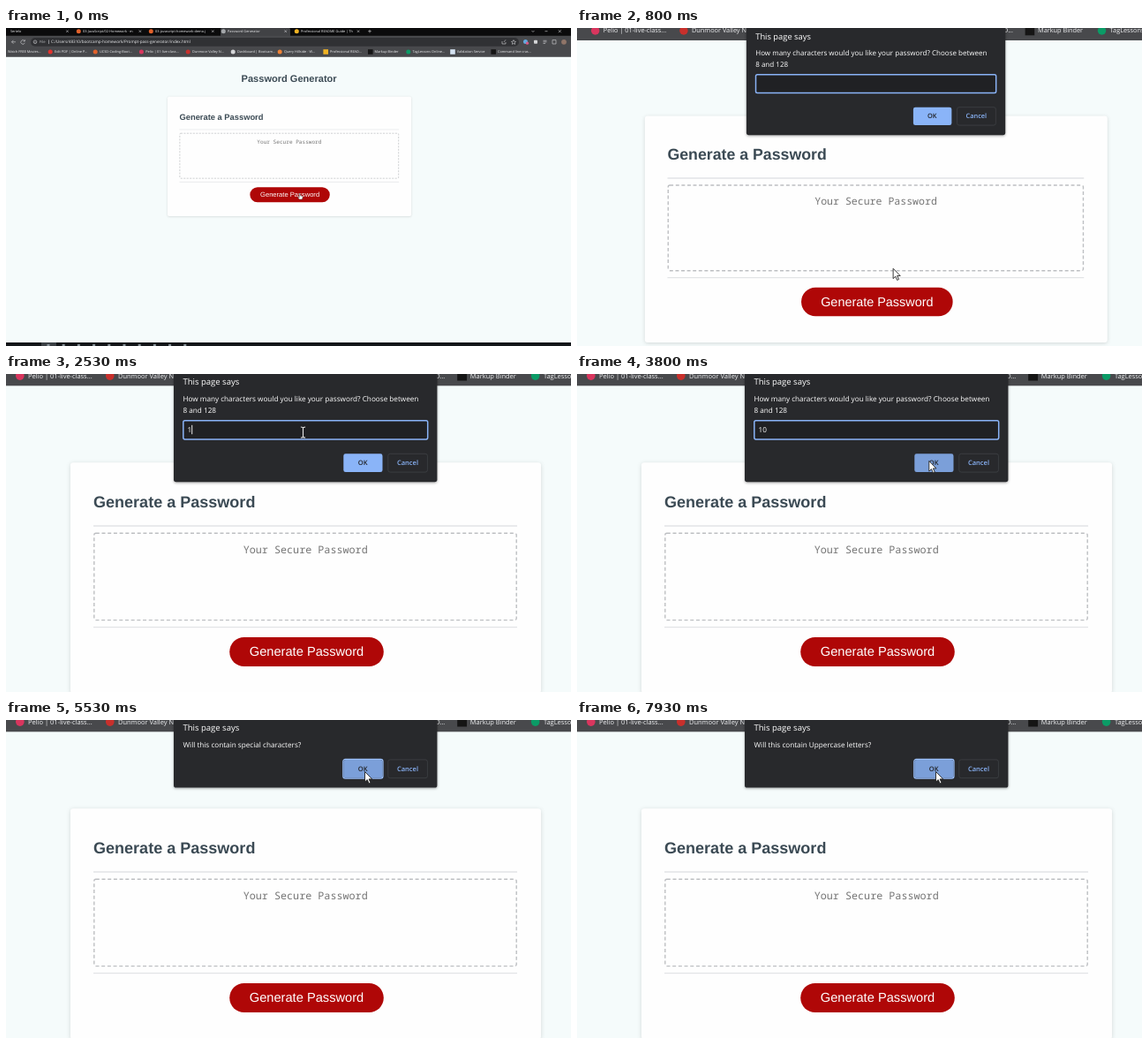
Animation of 640x360 px, one loop 8000 ms. Source, as an HTML page:

```html
<!DOCTYPE html>
<html lang="en">
<head>
<meta charset="utf-8">
<title>Password Generator</title>
<style>
  html, body { margin: 0; width: 100%; height: 100%; overflow: hidden; background: #f5fbfb; }
  svg { display: block; width: 640px; height: 360px; }
  text { text-rendering: geometricPrecision; white-space: pre; }
  .ui { font-family: "Open Sans", "Noto Sans", sans-serif; }
  .page { font-family: "Liberation Sans", Arial, sans-serif; fill: #3b4a54; }
  .mid { text-anchor: middle; }
  .card { filter: drop-shadow(0 1.3px 2.4px rgba(0, 0, 0, .14)); }
  .dialog { filter: drop-shadow(0 1px 1.6px rgba(0, 0, 0, .35)); }
  .line { fill: none; stroke: #d5d6d8; stroke-width: .6; }
</style>
</head>
<body>
<svg viewBox="0 0 640 360">
  <g id="camera">
    <!-- Browser window, in units of the unzoomed screen -->
    <g id="browser" class="ui" transform="translate(-280.3 -50) scale(1.9305)" fill="#eeeff1" font-size="3.87"></g>

    <g class="page">
      <text class="mid" x="338.7" y="67.5" font-size="21.33" font-weight="700">Password Generator</text>
      <rect class="card" x="73" y="100.3" width="533" height="261" rx="3.3" fill="#fefefe"/>
      <text x="99" y="151" font-size="18.05" font-weight="700">Generate a Password</text>
      <path d="M99 172H579M99 286.6H579" stroke="#e2e4e6" stroke-width="1.4"/>
      <rect x="99.8" y="180.2" width="478.4" height="98.4" rx="2" fill="none" stroke="#bdbfc2" stroke-width="1.4" stroke-dasharray="4 2.7"/>
      <text class="mid" x="339.2" y="202.8" font-size="11.75" fill="#757575" style="font-family:'Noto Sans Mono','DejaVu Sans Mono',monospace">Your Secure Password</text>
      <rect x="253.2" y="298" width="174.6" height="33" rx="16.5" fill="#af0707"/>
      <text class="mid" x="340.5" y="319.3" font-size="14.67" fill="#fff">Generate Password</text>
    </g>

    <g id="dialog" class="ui" font-size="8.18" fill="#fff">
      <rect id="panel" class="dialog" x="190" y="-9.7" width="298.4" rx="2.7" fill="#28292c"/>
      <text x="200.5" y="11.8" font-size="9.5">This page says</text>
      <text id="message" x="200.5" y="30.8"></text>
      <g id="prompt">
        <text x="200.5" y="44.2">8 and 128</text>
        <rect x="200.8" y="52.7" width="276.9" height="21.2" rx="1.8" fill="#202124" stroke="#8ab4f8" stroke-width="1.5"/>
        <text id="typed" x="205.6" y="66"></text>
        <rect id="caret" y="57.8" width=".9" height="10.4"/>
      </g>
      <g id="buttons" font-size="7.5" font-weight="600">
        <rect id="ring" x="381.8" y="-.2" width="45.2" height="21.8" rx="2.6" fill="#28292c" stroke="#9cc0fa" stroke-width="1.2"/>
        <rect id="ok" x="382.3" y=".3" width="44.2" height="20.8" rx="2.4"/>
        <text class="mid" x="404.1" y="13.2" fill="#202124">OK</text>
        <rect x="432.8" y=".3" width="44.6" height="20.8" rx="2.4" fill="none" stroke="#3f4246" stroke-width=".8"/>
        <text class="mid" x="455" y="13.2" fill="#8ab4f8">Cancel</text>
      </g>
    </g>

    <g id="pointer" stroke-linejoin="round">
      <path id="arrow" d="M0 0V11.6L2.7 9.1L4.6 13.4L6.5 12.5L4.6 8.4H8.2Z" fill="#fff" stroke="#222" stroke-width=".9"/>
      <path id="hand" d="M-1 .8Q0 -.8 1 .8V5L6 6.2Q7 6.6 6.6 8.5L5.4 13H-.8L-4 8.6Q-4 6.9 -2.6 7.5L-1 9Z" fill="#fff" stroke="#222" stroke-width=".8"/>
      <path id="beam" d="M-2.6 -6Q0 -6 0 -5Q0 -6 2.6 -6M0 -5V5M-2.6 6Q0 6 0 5Q0 6 2.6 6" fill="none" stroke="#e8e8e8" stroke-width="1.1"/>
    </g>
  </g>
</svg>
<script>
const LOOP = 8000;
const ZOOM_TIME = 1010, START_SCALE = .518, FOCUS = [301.2, 53.7];
const DIALOG_AT = 250, MOVE_AT = 700, BEAM_AT = 1290, LEAVE_INPUT = 3280;
const ONE_AT = 2400, ZERO_AT = 3000, SPECIAL_AT = 4100, UPPER_AT = 6700;
const el = id => document.getElementById(id);

// Shape helpers for the browser window
const rect = (x, y, w, h, fill, rx = 0) => `<rect x="${x}" y="${y}" width="${w}" height="${h}" rx="${rx}" fill="${fill}"/>`;
const dot = (x, y, fill, r = 2.5) => `<circle cx="${x}" cy="${y}" r="${r}" fill="${fill}"/>`;
const label = (x, y, text, extra = "") => `<text x="${x}" y="${y}" ${extra}>${text}</text>`;
const line = d => `<path class="line" d="${d}"/>`;

function drawBrowser() {
  const tabs = [
    [5, "Serielo"],
    [87, "03-JavaScript/02-Homework · m", "#e2622b"],
    [169, "03-javascript-homework-demo.j", "#e2622b"],
    [251, "Password Generator", "#a4a7aa"],
    [334, "Professional README Guide | Th", "#f0b323"]
  ];
  const bookmarks = [
    [2, "Watch FREE Movies..."],
    [55, "Edit PDF | Online P...", "#e5322d"],
    [106, "UCSD-Coding-Boot...", "#e2622b"],
    [158.2, "Pelio | 01-live-class...", "#d9365e"],
    [211, "Dunmoor Valley N...", "#c8302c"],
    [262, "Dashboard | Bootcam...", "#d5d6d8"],
    [315, "Query Hillside - W...", "#ef8236"],
    [367, "Professional READ...", "#f0b323", true],
    [417.6, "Markup Binder", "#151515", true],
    [460.6, "TagLessons Online...", "#0b9b66"],
    [510.8, "Validation Service", "#d5e3f2", true],
    [557, "Command line cras...", "#151515", true]
  ];
  let out = rect(0, 0, 640, 10, "#0b0b0c") + rect(243, 0, 79, 10, "#414245", 1.5) + rect(0, 8.8, 640, 24, "#48494c");
  tabs.forEach(([x, text, color], i) => {
    const close = 69.5 + i * 82.4;
    if (color) out += dot(x - 4.7, 3.7, color);
    out += label(x, 5.1, text) + line(`M${close - 1.2} 2.5l2.4 2.4m0 -2.4l-2.4 2.4`);
  });
  out += line("M410.2 3.7h3.6m-1.8 -1.8v3.6M595.5 3l1.5 1.5l1.5 -1.5M610.5 3.7h3M625.8 2.2l3 3m0 -3l-3 3");
  out += line("M11 15.8H6.5m2 -2l-2 2l2 2M21 14.6a2.3 2.3 0 1 0 .3 2.2m.1 -3.6v1.8h-1.8");
  out += rect(28, 11, 553, 9.8, "#303134", 4.9);
  out += `<circle class="line" cx="33" cy="15.8" r="1.8"/>` + line("M33 15.5v1.2M48.5 13.5v4.6");
  out += label(38, 17.3, "File", 'font-size="4.2" fill="#b7b9bc"');
  out += label(51, 17.4, "C:/Users/48310/bootcamp-homework/Prompt-pass-generator/index.html", 'font-size="4.63"');
  out += line("M562 15v3h4v-2M564 16l2 -2.6M575 13.6l.8 1.6l1.7 .2l-1.2 1.2l.3 1.8l-1.6 -.9l-1.6 .9l.3 -1.8l-1.2 -1.2l1.7 -.2z");
  out += dot(588.5, 15.5, "#63a8dd") + dot(590.5, 17.2, "#d85a87", 1.6) + rect(598, 13.8, 4, 4, "#d5d6d8", .8);
  out += line("M608.5 14.3h4m-4 1.6h4m-4 1.6h2.5M619 13.6h4v4.4h-4z") + dot(632, 15.8, "#907568", 2.9);
  bookmarks.forEach(([x, text, color, square]) => {
    if (color) out += square ? rect(x - 7.6, 24.2, 5.6, 5.6, color) : dot(x - 4.8, 27, color);
    out += label(x, 28.3, text);
  });
  out += rect(0, 356, 640, 4, "#121518") + rect(40, 356, 17, 4, "#3b4044");
  for (let x = 48; x < 210; x += 17.2) out += rect(x - 1.5, 358, 3, 2, "#8c969c");
  el("browser").innerHTML = out;
}

// [time, x, y] of the pointer's hot spot
const path = [
  [0, 362, 311.5], [MOVE_AT, 362, 311.5], [1060, 347, 127], [1350, 336.5, 66], [3100, 336.5, 66],
  [3600, 398.8, 98.5], [4300, 398.8, 98.5], [4900, 406.5, 58.5], [LOOP, 406.5, 58.5]
];

function pointerAt(t) {
  const i = path.findIndex(p => p[0] > t);
  const [t0, x0, y0] = path[i - 1], [t1, x1, y1] = path[i];
  const u = (t - t0) / (t1 - t0), k = u * u * (3 - 2 * u);
  return [x0 + (x1 - x0) * k, y0 + (y1 - y0) * k];
}

const easeInOut = u => u < .5 ? 4 * u ** 3 : 1 - 4 * (1 - u) ** 3;
const show = (id, on) => el(id).setAttribute("visibility", on ? "inherit" : "hidden");

function drawDialog(t, x, y) {
  const asking = t < SPECIAL_AT;
  const top = asking ? 90 : 44.6;
  const hover = x > 382 && x < 427 && y > top && y < top + 22;
  show("dialog", t >= DIALOG_AT);
  show("prompt", asking);
  show("ring", !asking);
  el("panel").setAttribute("height", asking ? 132 : 86.3);
  el("buttons").setAttribute("transform", `translate(0 ${top})`);
  el("ok").setAttribute("fill", hover ? "#7b9fd9" : "#8ab4f8");
  el("message").textContent = asking ? "How many characters would you like your password? Choose between"
    : `Will this contain ${t < UPPER_AT ? "special characters" : "Uppercase letters"}?`;

  const typed = t < ONE_AT ? "" : t < ZERO_AT ? "1" : "10";
  const lastKey = [DIALOG_AT, ONE_AT, ZERO_AT][typed.length];
  el("typed").textContent = typed;
  el("caret").setAttribute("x", 205.6 + typed.length * 4.68);
  show("caret", asking && t >= DIALOG_AT && (t - lastKey) % 1000 < 500);
}

function render(t) {
  const scale = START_SCALE + (1 - START_SCALE) * easeInOut(Math.min(t / ZOOM_TIME, 1));
  const [fx, fy] = FOCUS;
  el("camera").setAttribute("transform", `translate(${fx * (1 - scale)} ${fy * (1 - scale)}) scale(${scale})`);

  const [x, y] = pointerAt(t);
  const shape = t < MOVE_AT ? "hand" : t >= BEAM_AT && t < LEAVE_INPUT ? "beam" : "arrow";
  el("pointer").setAttribute("transform", `translate(${x} ${y})`);
  ["hand", "beam", "arrow"].forEach(id => show(id, id === shape));
  drawDialog(t, x, y);
}

drawBrowser();
const start = performance.now();
function tick() {
  render((performance.now() - start) % LOOP);
  requestAnimationFrame(tick);
}
tick();
</script>
</body>
</html>
```
